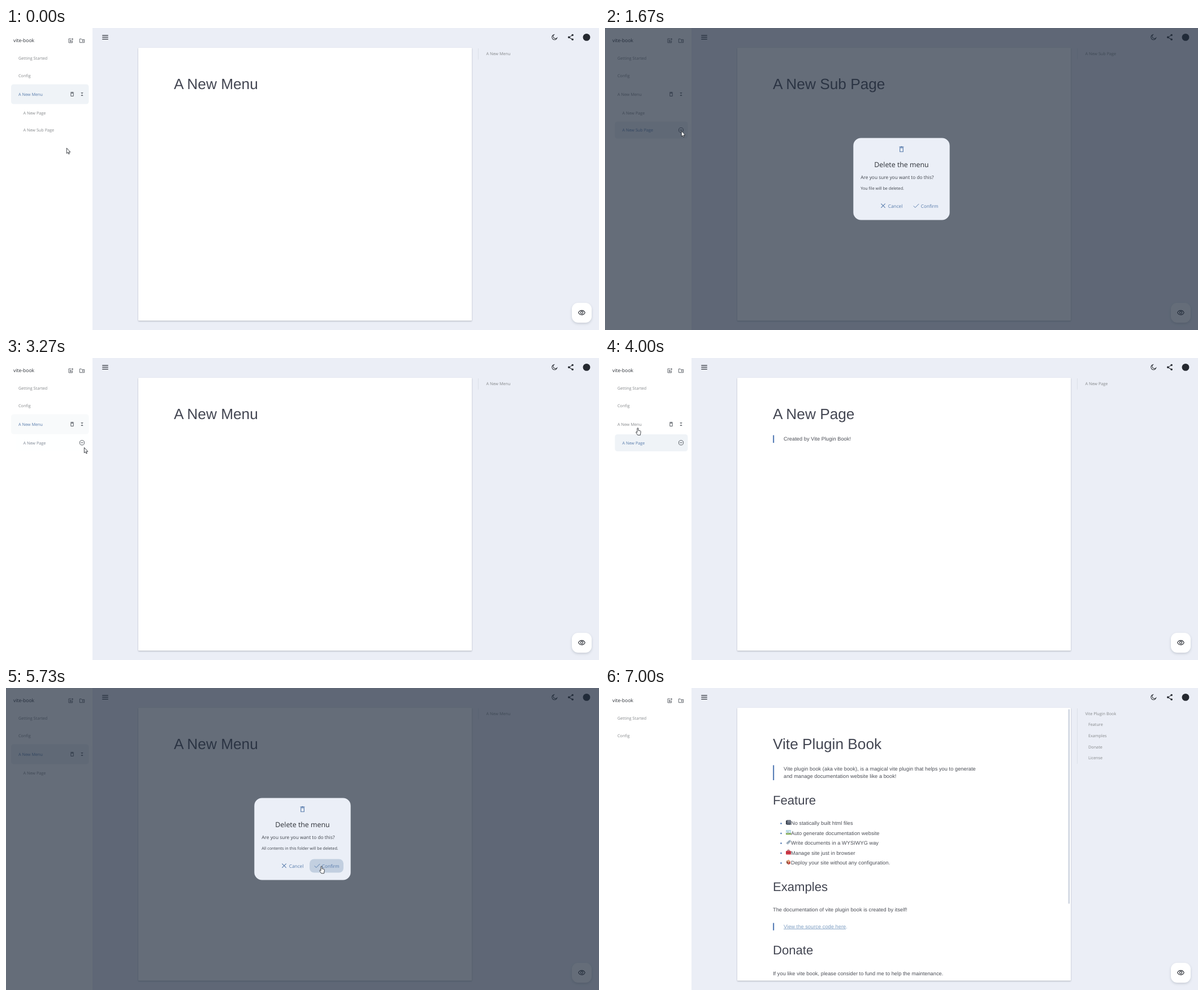
An HTML page that plays this animation: 1049 px wide and 534 px high, repeating every 7740 ms.

```html
<!DOCTYPE html>
<html lang="en">
<head>
<meta charset="utf-8">
<title>vite-book</title>
<style>
  html, body { margin: 0; width: 100%; height: 100%; overflow: hidden; background: #ebeef6; }
  svg { display: block; width: 1049px; height: 534px; }
  text { font-family: "Open Sans", "Noto Sans", sans-serif; text-rendering: geometricPrecision; white-space: pre; }
  .doc { font-family: "Liberation Sans", Arial, sans-serif; }
  .body { letter-spacing: .07px; }
  .card { filter: drop-shadow(0 1px .8px rgba(30, 40, 60, .32)); }
  .fab { filter: drop-shadow(0 2px 2px rgba(30, 40, 60, .17)); }
</style>
</head>
<body>
<svg id="stage" viewBox="0 0 1049 534"></svg>
<script>
const LOOP = 7740;
const INK = '#2b2f36', GREY = '#85888b', BLUE = '#577bab', HEADING = '#434652', BODY = '#4a4d55';

// ---------- drawing helpers ----------
const text = (x, y, s, size = 7.25, fill = GREY, attrs = '') =>
  `<text x="${x}" y="${y}" font-size="${size}" fill="${fill}" ${attrs}>${s}</text>`;
const heading = (y, s, size = 22.1) => text(297, y, s, size, HEADING, 'class="doc"');
const body = (x, y, s, fill = BODY, attrs = '') =>
  text(x, y, s, 9.19, fill, `class="doc body" ${attrs}`);
const rect = (x, y, w, h, fill, rx = 0, attrs = '') =>
  `<rect x="${x}" y="${y}" width="${w}" height="${h}" rx="${rx}" fill="${fill}" ${attrs}/>`;
const circle = (x, y, r, fill) => `<circle cx="${x}" cy="${y}" r="${r}" fill="${fill}"/>`;
const quote = (y, h) => rect(297, y, 2.2, h, '#5a80b8');
const group = (id, content) => `<g id="${id}">${content}</g>`;

// Icons live in a 24-unit box and are centred on (x, y).
const ICONS = {
  menu: 'M3 6.5H21M3 12H21M3 17.5H21',
  note: 'M14 4H4V20H19V11M8 10H14M8 13H16M8 16H16M19 2V9M15.500 5.500H22.500',
  folder: 'M3 5H9L11 7.500H21V19H3ZM12 13H18M15 10V16',
  trash: 'M7 8H17V20H7ZM5 5H19M9.500 4H14.500',
  fold: 'M8 4.500L12 8.500 16 4.500M8 19.500L12 15.500 16 19.500',
  remove: 'M12 3A9 9 0 0 1 12 21 9 9 0 0 1 12 3ZM7 12H17',
  moon: 'M10 4A8.300 8.300 0 1 0 20 14.500 7 7 0 0 1 10 4Z',
  share: 'M18 5L6 12 18 19',
  eye: 'M2 12C6 3 18 3 22 12 18 21 6 21 2 12ZM12 8.500A3.500 3.500 0 0 1 12 15.500 3.500 3.500 0 0 1 12 8.500Z',
  close: 'M5 5L19 19M19 5L5 19',
  check: 'M2.500 12.500L8.500 18.500 21.500 5.500'
};
const icon = (name, x, y, size, color = INK, width = 2) =>
  `<path d="${ICONS[name]}" fill="none" stroke="${color}" stroke-width="${width}"
    transform="translate(${x - size / 2} ${y - size / 2}) scale(${size / 24})"/>`;

// ---------- page contents ----------
const simplePage = (title, content = '') =>
  ({ doc: heading(108, title, 26.25) + content, toc: [title] });

const emoji = [
  rect(1, 0, 8, 8.5, '#555d6b', 1) + rect(3, 1.5, 5, 1, '#a5adba') + rect(3, 4, 5, 1, '#8d96a5') + rect(0, 1, 1.5, 6.5, '#343b48'),
  rect(0, 0, 9, 8, '#b9dce8') + rect(0, 5.5, 9, 2.7, '#80a84c') + '<path d="M1 5L4 2 6 5ZM5 3H8" fill="#597f99" stroke="#f4f7f6"/>',
  '<path d="M0 6L5 1 8.500 0 8.500 3.500 3.500 8.500Z" fill="#aebdca"/><path d="M2 6L7 2" stroke="#718699"/>',
  rect(0, 2, 9, 6.5, '#d33a49', 1) + '<path d="M3 2V.6H6V2" fill="none" stroke="#8a2530"/>' + rect(0, 4.5, 9, .8, '#8e2733'),
  '<path d="M1 2L5 0 8 3 4.500 5Z" fill="#dca27b"/><path d="M1 2L4.500 5V9L1 6Z" fill="#93503a"/><path d="M4.500 5L8 3V7L4.500 9Z" fill="#c8483f"/>'
];
const features = ['No statically built html files', 'Auto generate documentation website',
  'Write documents in a WYSIWYG way', 'Manage site just in browser',
  'Deploy your site without any configuration.'];
const featureList = features.map((s, i) => {
  const y = 242.3 + i * 17.5;
  return circle(311.5, y - 2.7, 1.4, '#5a80b8') +
    `<g transform="translate(320 ${y - 8.8})">${emoji[i]}</g>` + body(329, y, s);
}).join('');

const PAGES = {
  menu: simplePage('A New Menu'),
  sub: simplePage('A New Sub Page'),
  page: simplePage('A New Page', quote(136.5, 13.5) + body(316, 146.2, 'Created by Vite Plugin Book!')),
  home: {
    doc: heading(108, 'Vite Plugin Book', 26.25) + quote(136.5, 26.5) +
      body(316, 146.2, 'Vite plugin book (aka vite book), is a magical vite plugin that helps you to generate') +
      body(316, 159.3, 'and manage documentation website like a book!') +
      heading(205.5, 'Feature') + featureList + heading(358.7, 'Examples') +
      body(297, 395.3, 'The documentation of vite plugin book is created by itself!') + quote(415.5, 13) +
      body(316, 424.7, '<tspan text-decoration="underline">View the source code here</tspan>.', '#7f9fc3') +
      heading(471.3, 'Donate') +
      body(297, 508, 'If you like vite book, please consider to fund me to help the maintenance.') +
      rect(819.6, 37.5, 2.4, 344, '#cbd2de', 1),
    toc: ['Vite Plugin Book', 'Feature', 'Examples', 'Donate', 'License']
  }
};
const names = Object.keys(PAGES);
const toc = items => rect(835, 36, .8, 19.6 * items.length, '#d8dce5') +
  items.map((s, i) => text(i ? 855 : 849.5, 47.6 + i * 19.7, s)).join('');

// ---------- sidebar ----------
const removeButton = y => icon('remove', 134.5, y, 11, '#4a5058');
const entry = (id, x, top, h, label, buttons) => group(id,
  rect(x, top, 146.5 - x, h, '#eff3f7', 4.5, 'class="pill"') +
  text(x + 13, top + h / 2 + 2.7, label, 7.25, GREY, 'class="label"') + buttons);

const sidebar = rect(0, 0, 153, 534, '#fff') +
  text(13, 25.4, 'vite-book', 8.55, INK) +
  icon('note', 114.5, 22.5, 10.5, '#555a61') + icon('folder', 134.5, 22.5, 11, '#555a61') +
  text(22, 56.3, 'Getting Started') + text(22, 87, 'Config') +
  entry('menuEntry', 9, 99.5, 35, 'A New Menu',
    rect(111.5, 111.5, 11, 11, '#cfd6df', 5, 'id="trashHover"') +
    icon('trash', 117, 117, 10.5, '#42474f') + icon('fold', 134.5, 117, 9.5, '#42474f', 2.6)) +
  entry('pageEntry', 17.5, 135, 30, 'A New Page', `<g class="remove">${removeButton(149.8)}</g>`) +
  entry('subEntry', 17.5, 165.5, 30, 'A New Sub Page', `<g class="remove">${removeButton(180.5)}</g>`);

// ---------- whole stage ----------
const dialog = rect(0, 0, 1049, 534, 'rgba(32,44,62,.69)') +
  rect(439.3, 194.5, 170.4, 145, '#ebeff7', 13.5) +
  icon('trash', 524.5, 214.3, 13.5, BLUE) +
  text(524.5, 245.7, 'Delete the menu', 12.4, INK, 'text-anchor="middle"') +
  text(452.3, 267.3, 'Are you sure you want to do this?', 8.35, '#3e434b') +
  text(452.3, 286.4, '', 7.2, '#3e434b', 'id="warning"') +
  rect(537, 302.5, 60, 24, '#c2cfe0', 8, 'id="confirmHover"') +
  icon('close', 492, 314.3, 12.5, BLUE) + text(500.8, 317.5, 'Cancel', 8.25, BLUE) +
  icon('check', 550.5, 314.3, 12, BLUE) + text(558.8, 317.5, 'Confirm', 8.2, BLUE);

const share = icon('share', 999, 16.4, 13, INK, 2) +
  circle(1002.2, 12.5, 1.8, INK) + circle(995.8, 16.4, 1.8, INK) + circle(1002.2, 20.3, 1.8, INK);

document.getElementById('stage').innerHTML =
  rect(0, 0, 1049, 534, '#ebeef6') + sidebar +
  icon('menu', 175.5, 16.4, 14) + icon('moon', 970.3, 16.2, 13.2) + share + circle(1027, 16.4, 6.4, '#252930') +
  names.map(n => group(n + 'Toc', toc(PAGES[n].toc))).join('') +
  group('paper', rect(234, 35, 590, 482.5, '#fff', 1, 'class="card"') +
    names.map(n => group(n + 'Doc', PAGES[n].doc)).join('') +
    rect(1001, 486, 35, 35, '#fff', 11, 'class="fab"') + icon('eye', 1018.5, 503.2, 13.8)) +
  group('dialog', dialog) +
  group('cursor', `<g stroke="#20242a" stroke-width=".85" stroke-linejoin="round" fill="#fff">
    <path id="arrow" d="M.3 .3V9.800L2.400 7.900 3.900 11 5.300 10.400 3.900 7.300H6.800Z"/>
    <path id="hand" d="M-1 7V1.200A1 1 0 0 1 1 1.200V4.600L4.300 5.300Q5.400 5.700 5.300 6.900L4.500 12.800H-.2L-3 8.600Q-3.400 6.800-2.200 6.900L-1 8Z"/>
  </g>`);

// ---------- timeline ----------
const el = id => document.getElementById(id);
const show = (node, on) => { node.style.display = on ? '' : 'none'; };
const clamp = v => Math.min(1, Math.max(0, v));
const ramp = (t, start, length = 160) => clamp((t - start) / length);
const within = (t, a, b) => t >= a && t < b;

const CONTENT = [[0, 'menu'], [930, 'sub'], [2600, 'menu'], [3330, 'page'], [4270, 'menu'], [5940, 'home']];
const RELOADS = [3330, 4270];
const CURSOR = [
  [130, 107, 212], [730, 104, 184], [900, 104, 184], [1070, 131, 183], [1270, 131, 183], [1470, 135, 182],
  [1850, 135, 182], [2330, 554, 315], [2590, 554, 315], [3250, 138, 158], [3530, 142, 160],
  [3730, 133, 150], [3800, 133, 150], [4000, 58, 123.5], [4260, 58, 123.5], [4730, 114.5, 117.5],
  [4930, 114.5, 117.5], [5570, 554, 313], [5630, 554, 313], [5730, 558, 315],
  [5920, 558, 315], [6600, 56, 458], [7000, 42, 536]
];

function cursorAt(t) {
  const next = CURSOR.findIndex(k => k[0] > t);
  if (next === 0) return CURSOR[0].slice(1);
  if (next < 0) return CURSOR[CURSOR.length - 1].slice(1);
  const [t0, x0, y0] = CURSOR[next - 1], [t1, x1, y1] = CURSOR[next];
  const p = (t - t0) / (t1 - t0), e = p * p * (3 - 2 * p);
  return [x0 + (x1 - x0) * e, y0 + (y1 - y0) * e];
}

function setEntry(id, visible, selected) {
  const node = el(id), remove = node.querySelector('.remove');
  show(node, visible);
  node.querySelector('.pill').style.opacity = selected;
  node.querySelector('.label').style.fill =
    `color-mix(in srgb, ${BLUE} ${clamp(selected * 3) * 100}%, ${GREY})`;
  if (remove) show(remove, selected > 0);
}

function render(t) {
  const current = CONTENT.filter(c => c[0] <= t).pop()[1];
  for (const n of names) {
    show(el(n + 'Doc'), n === current);
    show(el(n + 'Toc'), n === current);
  }
  const reload = RELOADS.find(r => within(t, r, r + 150));
  el('paper').style.opacity = reload ? .3 + .7 * ramp(t, reload, 150) : 1;

  const menuAlive = t < 5870, subAlive = t < 2530;
  setEntry('menuEntry', menuAlive,
    1 - ramp(t, 800) + ramp(t, 2490) - ramp(t, 3200, 130) + ramp(t, 4200));
  setEntry('pageEntry', menuAlive, ramp(t, 3260) - ramp(t, 4200));
  setEntry('subEntry', subAlive, ramp(t, 850));

  const first = within(t, 1670, 2530), second = within(t, 4930, 5870);
  const modal = first || second;
  show(el('dialog'), modal);
  el('warning').textContent = first ? 'You file will be deleted.' : 'All contents in this folder will be deleted.';

  const [x, y] = cursorAt(t);
  const overConfirm = modal && within(x, 537, 597) && within(y, 302, 327);
  const overTrash = !modal && menuAlive && within(x, 111, 123) && within(y, 111, 123);
  const listEnd = subAlive ? 195 : menuAlive ? 165 : 95;
  const overLink = !modal && !overTrash && within(x, 18, 129) && within(y, 40, listEnd);
  show(el('confirmHover'), overConfirm);
  show(el('trashHover'), overTrash);
  show(el('hand'), overConfirm || overLink);
  show(el('arrow'), !(overConfirm || overLink));
  show(el('cursor'), t < 7000);
  el('cursor').setAttribute('transform', `translate(${x} ${y})`);
}

const start = performance.now();
function tick() {
  render((performance.now() - start) % LOOP);
  requestAnimationFrame(tick);
}
tick();
</script>
</body>
</html>
```
